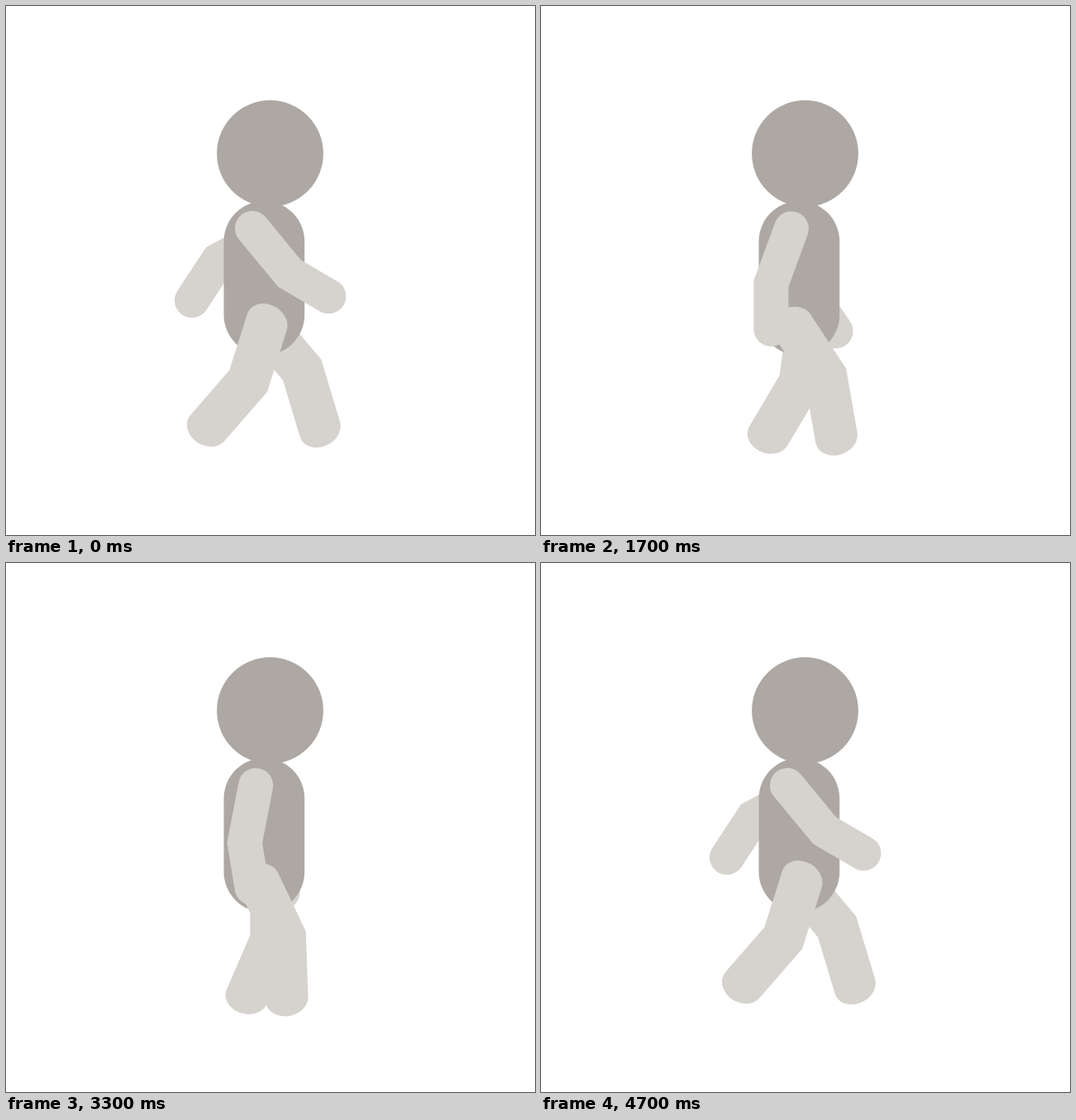
An HTML page with a canvas that plays this animation: 640x640 px, repeating every 4800 ms.

```html
<!DOCTYPE html>
<html lang="en">
<head>
<meta charset="utf-8">
<title>Walking figure</title>
<style>
  html, body { margin: 0; width: 100%; height: 100%; overflow: hidden; background: #fff; }
  canvas { display: block; }
</style>
</head>
<body>
<canvas width="640" height="640"></canvas>
<script>
const ctx = document.querySelector('canvas').getContext('2d');
const LOOP = 4800, STEP = 100, START = 57, END = 4687;
const DARK = '#ada8a4', LIGHT = '#d6d3ce';

// Each limb is a rigid bent stroke that swings about its pivot.
// Points run from the body outwards; angles are degrees from straight down.
const backArm = { pivot: [318.5, 276], from: -49.4, swing: 94.9, wide: 1,
  points: [[-1.2, -1], [-16, 67.8], [0, 123.3]] };
const backLeg = { pivot: [318.3, 397.2], from: 28.2, swing: -67, wide: 26 / 21,
  points: [[-0.7, -16.8], [14.9, 56.5], [0, 130.3]] };
const frontLeg = { pivot: [312.5, 397], from: -31.2, swing: 71.8, wide: 26 / 21,
  points: [[-4.7, -14.1], [12.9, 58.7], [0, 133]] };
const frontArm = { pivot: [300, 273.5], from: 39.7, swing: -84.2, wide: 1,
  points: [[1.3, -4.8], [1.1, 66], [19.9, 117.6]] };

function drawLimb({ pivot, from, swing, wide, points }, progress) {
  ctx.save();
  ctx.translate(...pivot);
  ctx.rotate(-(from + swing * progress) * Math.PI / 180);
  ctx.scale(wide, 1);
  ctx.beginPath();
  for (const [x, y] of points) ctx.lineTo(x / wide, y);
  ctx.lineWidth = 42;
  ctx.lineCap = 'round';
  ctx.strokeStyle = LIGHT;
  ctx.stroke();
  ctx.restore();
}

function drawBody() {
  ctx.fillStyle = DARK;
  ctx.beginPath();
  ctx.roundRect(263.5, 236, 97.7, 186.5, 48.85);
  ctx.fill();
  ctx.beginPath();
  ctx.arc(319.5, 178.5, 64.4, 0, 2 * Math.PI);
  ctx.fill();
}

function draw(now) {
  const t = Math.floor(now % LOOP / STEP) * STEP;
  // Steady swing out and back, with a short rest at the loop point.
  const progress = Math.max(0, Math.min(t - START, END - t) / ((END - START) / 2));
  ctx.fillStyle = '#fff';
  ctx.fillRect(0, 0, 640, 640);
  drawLimb(backArm, progress);
  drawLimb(backLeg, progress);
  drawBody();
  drawLimb(frontLeg, progress);
  drawLimb(frontArm, progress);
  requestAnimationFrame(draw);
}
requestAnimationFrame(draw);
</script>
</body>
</html>
```
